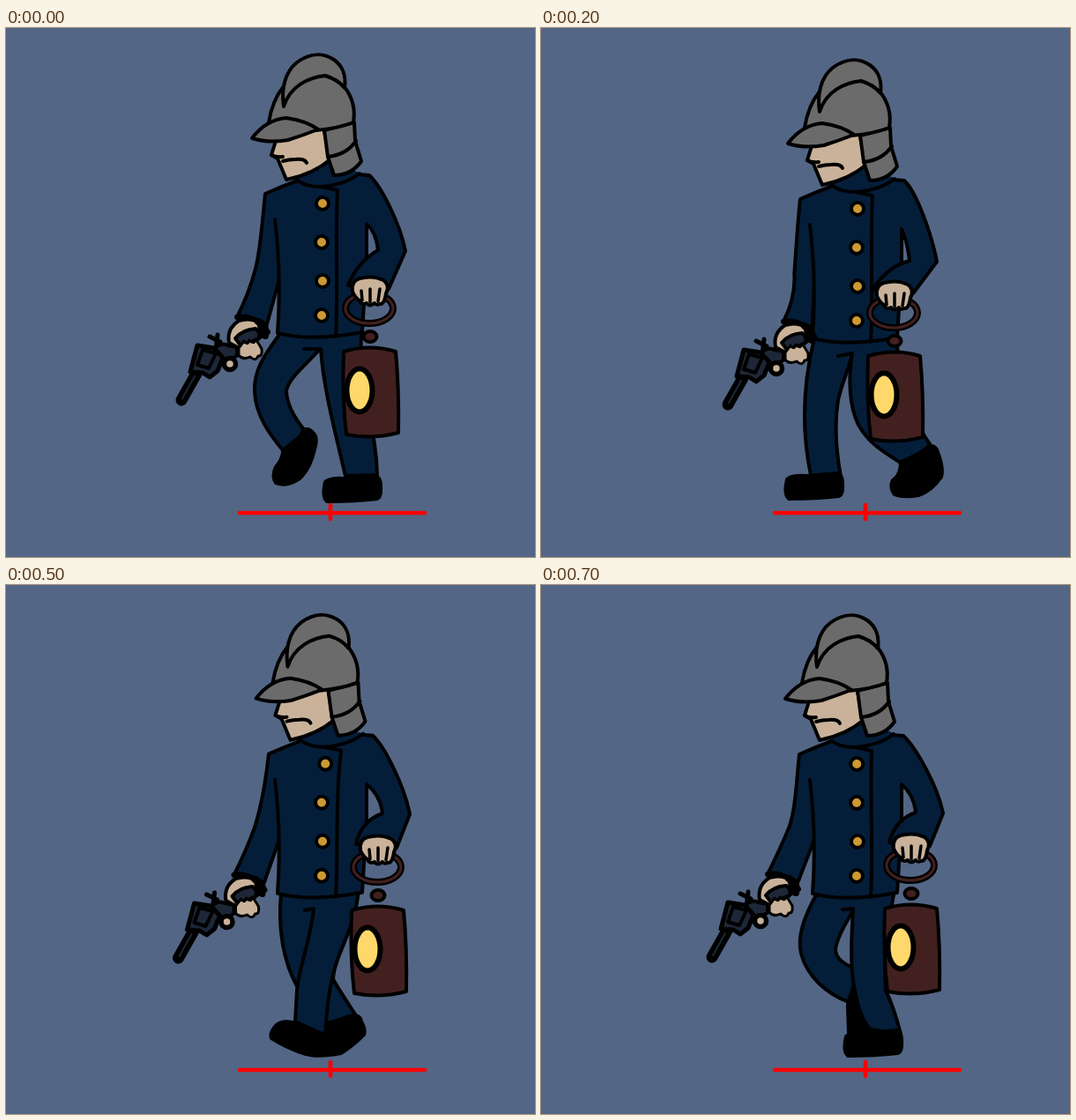
Animation of 600 by 600 pixels, one loop 0.8 s. Source, as an HTML page:

```html
<!DOCTYPE html>
<html lang="en">
<head>
<meta charset="utf-8">
<title>Walk cycle</title>
<style>
html, body { margin: 0; width: 100%; height: 100%; overflow: hidden; background: #536685; }
svg { display: block; width: 100%; height: 100%; }
</style>
</head>
<body>
<svg viewBox="0 0 600 600">
  <g id="man" stroke="#000" stroke-width="4" stroke-linejoin="round" stroke-linecap="round"></g>
  <path d="M265 550H475M368 541V557" stroke="#f00" stroke-width="4.6" stroke-linecap="round"/>
</svg>
<script>
const NAVY = '#041e3a', GREY = '#6b6b6b', SKIN = '#c9b299', BROWN = '#432020', STEEL = '#1d2737';
const STEP = 100;

const path = (d, fill = 'none', extra = '') => `<path d="${d}" fill="${fill}" ${extra}/>`;
const oval = (x, y, rx, ry, fill, extra = '') =>
  `<ellipse cx="${x}" cy="${y}" rx="${rx}" ry="${ry}" fill="${fill}" ${extra}/>`;
const at = (x, y, body) => `<g transform="translate(${x} ${y})">${body}</g>`;

// flat shoe with its sole's left end at x
const flat = (x, y = 0) => at(x - 360, y, path(
  'M362 515Q367 510 384 511L419 508Q425 510 425 519Q426 532 421 534Q396 537 364 537Q358 532 362 515Z', '#000'));
const shoe = d => path(d, '#000');

// body: [sway of the head, drop, shoulder shift]; the rest are offsets of gun, lantern and elbow
const poses = [
  { body: [0, 0, 0], gun: [0, 0], lamp: [0, 0], elbow: [0, 0],
    far: 'M312 345C290 375 281 390 282 412C283 440 300 462 314 479L340 458C325 440 318 425 318 411C322 395 340 383 356 364L380 345',
    farShoe: shoe('M337 456Q344 453 349 460Q354 465 350 478Q345 500 333 511Q318 521 306 516Q301 508 306 498Q313 490 314 481Q330 475 337 456Z'),
    near: 'M338 364H357C360 410 375 465 385 508L421 507C420 450 400 420 403 345L358 345',
    nearShoe: flat(360) },
  { body: [0, 4, 0], gun: [10.5, 4], lamp: [-11, 4], elbow: [-5, 9],
    far: 'M310 350C296 390 288 430 283 497L317 510C322 470 325 440 330 422C338 400 348 385 354 369L380 345',
    farShoe: shoe('M284 498Q268 491 260 499Q254 507 256 513Q275 525 290 531Q305 535 316 532Q318 520 316 512Q300 502 284 498Z'),
    near: 'M337 370L355 367C355 400 360 430 372 453C382 472 400 486 415 501L448 487C430 460 412 430 402 345L356 345',
    nearShoe: shoe('M416 502Q432 495 447 488Q454 488 456 495Q461 504 459 510Q445 524 433 531Q415 536 400 533Q393 525 395 517Q403 511 412 511Z') },
  { body: [1, 6, 0], gun: [13, 5], lamp: [-12, 5], elbow: [-4, 12],
    far: 'M310 352C298 400 294 450 306 507L340 509C333 470 334 440 337 422C342 400 350 385 353 369L380 345',
    farShoe: flat(277, -3),
    near: 'M337 372L353 369C348 400 350 430 360 450C372 472 392 483 408 493L443 475C425 450 410 420 402 345L354 345',
    nearShoe: shoe('M408 492Q426 487 440 474Q448 473 450 481Q457 500 454 509Q443 525 428 530Q412 533 401 529Q395 521 399 513Q408 507 408 492Z') },
  { body: [2, 4, -1], gun: [9.5, 3.5], lamp: [-5, 1], elbow: [0, 11],
    far: 'M310 352C306 390 306 420 309 438C313 465 322 485 327 507L362 509C357 480 352 460 346 440L380 345',
    farShoe: flat(298, -3),
    near: 'M336 371L351 367C343 395 342 425 348 443C358 468 380 477 404 480L436 462L403 345L354 345',
    nearShoe: shoe('M408 470L433 462Q434 485 440 500Q440 512 431 520Q420 526 410 520Q405 510 406 497Q401 488 403 480Z') },
  { body: [4.5, 0, 1], gun: [4, -1], lamp: [3, -3], elbow: [2, 7],
    far: 'M311 345C312 400 324 460 347 507L362 505L358 345',
    farShoe: flat(319, -3),
    near: 'M335 368Q341 364 350 366C336 385 333 405 336 424C340 445 350 460 360 468L388 457C375 440 367 425 370 410C374 394 398 378 402 345L354 345',
    nearShoe: shoe('M359 468L386 457Q396 456 396 463Q386 485 383 500L383 515L349 515Q353 490 359 468Z') },
  { body: [4.5, 3.7, 4], gun: [-3.5, 1], lamp: [9, 2], elbow: [5, 7],
    far: 'M312 350C308 390 315 428 330 455L366 497L396 487C385 470 375 455 371 447L380 345',
    farShoe: shoe('M363 499L394 488Q402 488 403 495Q408 504 406 510Q393 523 380 531Q360 535 345 533L350 505Z'),
    near: 'M339 369L349 367C346 400 332 435 330 460L328 495L362 511C364 480 366 455 376 425C385 400 397 380 400 345L354 345',
    nearShoe: shoe('M328 497Q312 492 305 501Q299 508 301 514Q320 526 340 532Q355 535 363 532L362 510Z') },
  { body: [1.5, 6, 1], gun: [-8, 2], lamp: [15, 3], elbow: [7, 8],
    far: 'M312 350C299 390 302 420 318 440C332 460 352 472 372 484L398 466C382 455 374 445 370 435L380 345',
    farShoe: shoe('M372 482L396 466Q404 465 405 473Q407 495 403 508Q394 522 380 524Q369 522 367 513Q374 500 372 482Z'),
    near: 'M339 372L351 369C347 400 338 435 341 460Q344 485 351 507L385 509C380 475 380 455 385 430C392 400 399 380 400 345L354 345',
    nearShoe: flat(322, -3) },
  { body: [-2, 4, -1], gun: [-5, 0], lamp: [7, 0], elbow: [3, 6],
    far: 'M314 348C296 380 291 400 295 418C302 445 325 464 349 473L360 436C340 430 331 420 335 408C340 390 350 378 354 368L380 345',
    farShoe: shoe('M356 460Q347 468 348 480L349 508L375 505Q365 480 360 460Z'),
    near: 'M342 368L354 367C352 400 350 440 357 465Q361 488 373 504L408 509C403 490 396 470 391 460C388 420 395 380 401 345L356 345',
    nearShoe: flat(344, -3) }
];

const head =
  path('M306 128L301 144L308 148L318 172Q348 166 368 149L360 112Z', SKIN) +
  path('M301 144Q306 147 314 146M314 151Q321 149 328 149Q339 148 341 153') +
  path('M361 116L395 107L396 128L403 151Q392 167 372 167L365 146Z', GREY) +
  path('M365 146Q386 144 397 128') +
  path('M298 107Q302 82 315 66L325 50L362 54Q376 58 384 67C394 80 396 95 394 107Q376 114 352 116Z', GREY) +
  path('M315 89C312 70 316 50 330 39C345 28 360 28 372 36C382 43 386 55 384 68Q376 58 362 54C343 56 322 66 315 89Z', GREY) +
  path('M279 125Q295 104 318 102Q340 105 354 115Q336 122 320 127Q297 131 279 125Z', GREY);

const gun =
  path('M262 328Q284 325 297 345', 'none', 'stroke-width="6"') +
  path('M253 357Q250 341 264 332Q277 328 286 334L290 350L266 364Z', SKIN) +
  path('M286 333Q296 337 294 349', 'none', 'stroke-width="8"') +
  path('M216 392L199 422', 'none', 'stroke-width="13"') +
  path('M214 395L200 420', 'none', `stroke="${STEEL}" stroke-width="2"`) +
  path('M231 350L243 356M240 348L238 365', 'none', 'stroke-width="5"') +
  path('M238 362Q247 356 251 360L262 362L262 372L246 379L240 374Z', STEEL) +
  path('M217 360L236 363L246 374L240 389L231 396L223 391L209 390Z', STEEL, 'stroke-width="5"') +
  path('M223 365L238 369L230 386L217 382Z', STEEL) +
  path('M260 352Q268 342 283 341Q290 346 286 353L266 360Z', STEEL) +
  path('M264 363L270 355Q274 361 276 354Q281 360 283 353Q288 360 290 364Q291 373 286 372Q283 379 277 373Q268 377 264 371Z', SKIN, 'stroke-width="3"') +
  oval(254, 381, 6.5, 6.5, SKIN, 'stroke-width="5.5"');

const lamp =
  oval(412, 318, 27, 17, 'none', 'stroke-width="8"') +
  oval(412, 318, 27, 17, 'none', `stroke="${BROWN}" stroke-width="3"`) +
  oval(413, 350, 7.5, 6, BROWN) +
  path('M383 367Q413 358 442 367Q446 410 445 459Q415 467 386 461Q381 420 383 367Z', BROWN) +
  oval(401, 411, 14.5, 24.5, '#ffd86b', 'stroke-width="6"') +
  path('M393 299Q391 287 401 284Q416 280 428 286Q436 292 431 301Q429 314 424 313Q420 315 418 312Q412 317 409 312Q403 315 401 309Q396 306 393 299Z', SKIN) +
  path('M403 298L404 309M413 296V311M424 296L422 310', 'none', 'stroke-width="3.5"');

function draw({ body: [sway, drop, s], gun: [gx, gy], lamp: [lx, ly], elbow: [ex, ey], far, farShoe, near, nearShoe }) {
  // limb joints relative to the dropped torso
  const g = gy - drop, l = ly - drop, e = ey - drop;
  const chest = path(`M${296 + s} 189L${322 + s} 175L367 148L390 160L${411 + s} 168L409 260H309L305 215Z`, NAVY, 'stroke="none"');
  const gunArm = path(`M${331 + s} 173Q${312 + s} 180 ${294 + s} 188C${291 + s} 215 289 250 ${283 + gx / 3} ${273 + g / 2}` +
    `Q${276 + gx} ${300 + g} ${262 + gx} ${328 + g}L${294 + gx} ${343 + g}L310 285`, NAVY);
  const coat = path('M305 217C309 250 312 290 308 346Q345 356 404 345L409 264V222', NAVY) +
    path(`M${331 + s} 173Q${340 + s} 180 ${356 + s} 180Q${385 + s} 178 ${401 + s} 165M${357 + s} 180L${376 + s} 184C373 240 377 300 374 350`);
  const buttons = [[359 + s * .8, 199], [358, 243], [359, 287], [358, 326]]
    .map(([x, y]) => oval(x, y, 7, 7, '#cc9933', 'stroke-width="4"')).join('');
  const lampArm = path(`M${399 + s} 166L${412 + s} 167C${426 + s} 180 ${447 + ex} ${222 + e} ${453 + ex} ${253 + e}L${434 + lx} ${296 + l}L${388 + lx} ${292 + l}` +
    `Q${398 + lx / 2} ${266 + l} ${422 + ex} ${252 + e}Q${420 + ex} ${232 + e} 409 222`, NAVY);

  return path(far, NAVY) + farShoe + path(near, NAVY) + nearShoe +
    at(0, drop, chest + gunArm + coat + buttons + lampArm) +
    at(sway, drop, head) + at(gx, gy, gun) + at(lx, ly, lamp);
}

const man = document.getElementById('man');
let shown = -1;
function tick(now) {
  const i = Math.floor(now / STEP) % poses.length;
  if (i !== shown) man.innerHTML = draw(poses[shown = i]);
  requestAnimationFrame(tick);
}
tick(0);
</script>
</body>
</html>
```
